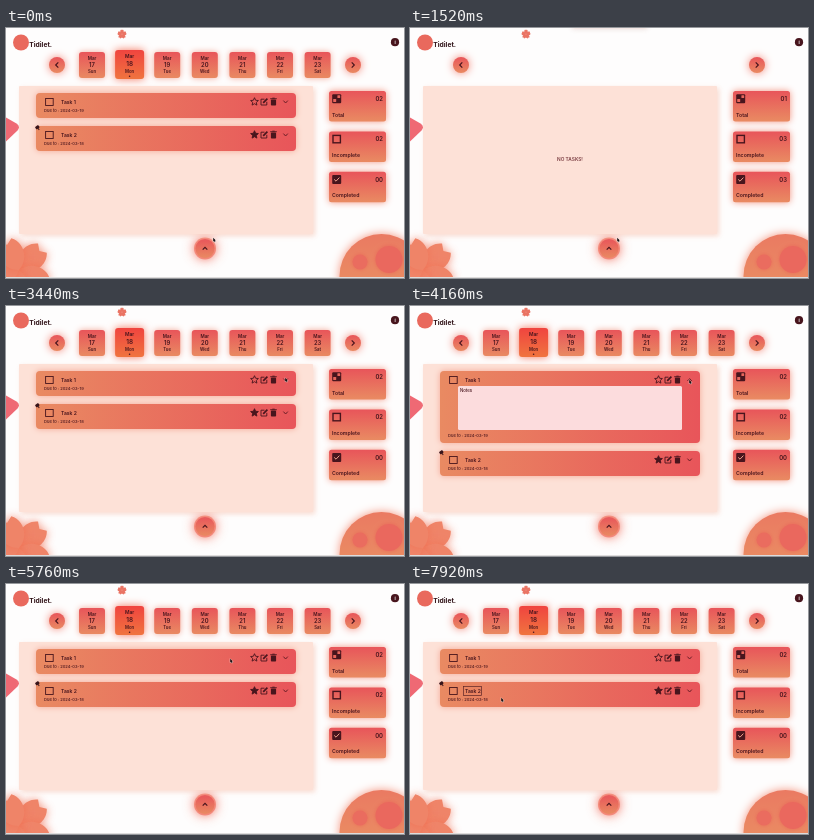
An HTML page with a canvas that plays this animation: 398x250 px, repeating every 8 s.

```html
<!DOCTYPE html>
<html lang="en">
<head>
<meta charset="utf-8">
<title>Task list</title>
<style>
html, body { margin: 0; width: 100%; height: 100%; overflow: hidden; background: #fefdfd; }
canvas { display: block; width: 398px; height: 250px; }
</style>
</head>
<body>
<canvas id="stage"></canvas>
<script>
const W = 398, H = 250, LOOP = 8000;
const INK = '#48151d', RED = '#e8555a', ORANGE = '#e98a62';
const canvas = document.getElementById('stage');
const ctx = canvas.getContext('2d');
const ratio = window.devicePixelRatio || 1;
canvas.width = W * ratio;
canvas.height = H * ratio;

// Times of the story, in ms
const RELOAD = 1040, LOADED = 2000;
const TOAST_IN = 1495, TOAST_OUT = 3000;
const OPEN = 3600, CLOSE = 4800, EDIT = 7400;

const POINTER = [
  [0, 208, 211], [1800, 208, 211], [2400, 295, 130], [3000, 281, 76],
  [3440, 280, 73], [4160, 280, 75], [5000, 280, 75], [5600, 225, 76],
  [5900, 225, 76], [6700, 66, 75], [7150, 64, 106], [7500, 64, 107],
  [7850, 92, 115], [8000, 92, 115]
];

const clamp = v => Math.max(0, Math.min(1, v));
const part = (t, start, length) => clamp((t - start) / length);
const easeOut = p => 1 - (1 - p) ** 3;
const smooth = p => p * p * (3 - 2 * p);

function blend(x0, y0, x1, y1, from, to) {
  const g = ctx.createLinearGradient(x0, y0, x1, y1);
  g.addColorStop(0, from);
  g.addColorStop(1, to);
  return g;
}

function glow(color, blur, dx = 0, dy = 0) {
  ctx.shadowColor = color;
  ctx.shadowBlur = blur * ratio;
  ctx.shadowOffsetX = dx * ratio;
  ctx.shadowOffsetY = dy * ratio;
}

function noGlow() {
  glow('transparent', 0);
}

function box(x, y, w, h, r, fill) {
  ctx.beginPath();
  ctx.roundRect(x, y, w, h, r);
  ctx.fillStyle = fill;
  ctx.fill();
}

function disc(x, y, r, fill) {
  ctx.beginPath();
  ctx.arc(x, y, r, 0, Math.PI * 2);
  ctx.fillStyle = fill;
  ctx.fill();
}

function line(points, color = INK, width = 1) {
  ctx.beginPath();
  points.forEach(([x, y]) => ctx.lineTo(x, y));
  ctx.strokeStyle = color;
  ctx.lineWidth = width;
  ctx.stroke();
}

function text(s, x, y, size, weight = 600, align = 'left', color = INK) {
  ctx.font = `${weight} ${size}px Inter, sans-serif`;
  ctx.textAlign = align;
  ctx.fillStyle = color;
  ctx.fillText(s, x, y);
}

function flower(x, y, size, turn, fill) {
  ctx.save();
  ctx.translate(x, y);
  ctx.fillStyle = fill;
  for (let i = 0; i < 5; i++) {
    ctx.save();
    ctx.rotate(turn + i * Math.PI * 0.4);
    ctx.scale(size, size);
    ctx.beginPath();
    ctx.moveTo(0, 0);
    ctx.bezierCurveTo(0.2, -0.45, 0.75, -0.5, 1, -0.2);
    ctx.lineTo(0.87, 0);
    ctx.lineTo(1, 0.2);
    ctx.bezierCurveTo(0.75, 0.5, 0.2, 0.45, 0, 0);
    ctx.fill();
    ctx.restore();
  }
  ctx.restore();
}

function scenery() {
  ctx.fillStyle = '#fefdfd';
  ctx.fillRect(0, 0, W, H);

  flower(116, 6.2, 4.6, -Math.PI / 2, '#ea7464');

  ctx.beginPath();
  ctx.moveTo(-2, 88.5);
  ctx.lineTo(10.5, 95.5);
  ctx.quadraticCurveTo(15, 98.5, 11.5, 102.5);
  ctx.lineTo(0, 113.5);
  ctx.lineTo(-2, 114);
  ctx.fillStyle = '#ef6974';
  ctx.fill();

  glow('rgba(240,110,80,.75)', 10);
  flower(13, 242, 32, -0.75, '#ef8468');
  disc(375.5, 248, 42, blend(0, 206, 0, 250, '#ea7a62', '#ea8a62'));
  glow('rgba(232,80,80,.5)', 4);
  disc(354, 234, 7.5, '#ea6c5f');
  disc(383, 231.5, 13.5, '#ea685e');
  noGlow();

  ctx.fillStyle = '#dedcdc';
  ctx.fillRect(0, 249, W, 1);
}

function roundButton(x, y, r, dir) {
  glow('rgba(238,90,70,.75)', r);
  disc(x, y, r, blend(0, y - r, 0, y + r, RED, ORANGE));
  noGlow();
  const tip = dir === 'up'
    ? [[x - 2.3, y + 1.2], [x, y - 1.2], [x + 2.3, y + 1.2]]
    : [[x - dir * 1.3, y - 2.6], [x + dir * 1.3, y], [x - dir * 1.3, y + 2.6]];
  line(tip, INK, 1.2);
}

function header() {
  disc(15, 14.5, 8, '#e9695d');
  text('Tidilet.', 23.3, 19.2, 6.7, 700, 'left', '#32151a');
  disc(389, 14.2, 4.1, INK);
  text('i', 389, 15.8, 4.5, 700, 'center', '#fff');
  roundButton(51, 37, 8, -1);
  roundButton(347, 37, 8, 1);
  glow('rgba(240,80,60,.7)', 14);
  disc(199, 220.5, 11, 'rgba(240,105,85,.6)');
  roundButton(199, 220.5, 9.5, 'up');
}

function dates() {
  'Sun Mon Tue Wed Thu Fri Sat'.split(' ').forEach((name, i) => {
    const x = 86 + i * 37.6, on = i === 1;
    const w = on ? 29 : 26, top = on ? 22 : 24;
    glow(on ? 'rgba(242,80,50,.8)' : 'rgba(236,120,95,.65)', on ? 8 : 6);
    box(x - w / 2, top, w, on ? 29 : 26, 3,
      on ? blend(0, 22, 0, 51, '#f0443f', '#f0743f') : blend(0, 24, 0, 50, RED, ORANGE));
    noGlow();
    text('Mar', x, on ? 30 : 32, on ? 4.9 : 4.6, 600, 'center');
    text(17 + i, x, on ? 38 : 39.2, on ? 6.4 : 5.8, 600, 'center');
    text(name, x, 45.2, 4.3, 600, 'center');
    if (on) disc(x, 48.2, 0.8, INK);
  });
}

function stats(values) {
  ['Total', 'Incomplete', 'Completed'].forEach((label, i) => {
    const y = 63 + i * 40.4;
    glow('rgba(238,110,85,.75)', 7);
    box(323, y, 57, 30.5, 2.5, blend(0, y, 0, y + 30, RED, ORANGE));
    noGlow();
    if (i === 1) {
      ctx.strokeStyle = INK;
      ctx.lineWidth = 1.4;
      ctx.strokeRect(327, y + 4, 7.4, 7.4);
    } else {
      box(326.2, y + 3.2, 9, 9, 1, INK);
    }
    if (i === 0) {
      box(327.2, y + 8, 3, 3, 0.5, '#e8665c');
      box(331.4, y + 4.2, 2.8, 2.8, 0.5, '#e8665c');
    }
    if (i === 2) line([[328.2, y + 7.6], [330, y + 9.4], [333.4, y + 5.8]], '#f0a08c', 1);
    text(values[i], 377, y + 9.8, 5.9, 600, 'right');
    text(label, 326, y + 25.6, 5.2, 600);
  });
}

function star(x, y, filled) {
  ctx.beginPath();
  for (let i = 0; i < 10; i++) {
    const a = -Math.PI / 2 + i * Math.PI / 5, r = i % 2 ? 1.9 : 4.1;
    ctx.lineTo(x + r * Math.cos(a), y + r * Math.sin(a));
  }
  ctx.closePath();
  ctx.strokeStyle = ctx.fillStyle = INK;
  ctx.lineWidth = 0.9;
  ctx.stroke();
  if (filled) ctx.fill();
}

function actions(y, starred, open) {
  star(248.5, y, starred);
  line([[258.5, y - 2.6], [255, y - 2.6], [255, y + 3.2], [260.8, y + 3.2], [260.8, y]], INK, 0.9);
  line([[257.2, y + 1], [261.4, y - 3.2]], INK, 1.7);
  box(264.9, y - 2.2, 5.2, 6, 0.8, INK);
  ctx.fillRect(264.2, y - 3.5, 6.6, 0.9);
  ctx.fillRect(266.3, y - 4.1, 2.4, 0.8);
  const d = 1.2 * (1 - 2 * open);
  line([[277.4, y - d], [279.6, y + d], [281.8, y - d]], '#6c1f27', 1);
}

function card(y, extra, title, due, starred, editing) {
  const h = 25 + extra;
  glow('rgba(238,130,105,.6)', 6);
  box(30, y, 260, h, 4, blend(30, 0, 290, 0, ORANGE, RED));
  noGlow();

  if (extra > 1) {
    ctx.save();
    ctx.beginPath();
    ctx.rect(30, y + 14, 260, extra - 1);
    ctx.clip();
    box(48, y + 15, 224, Math.max(0, extra - 3), 1.5, '#fcdcdd');
    text('Notes', 50, y + 21, 4.3, 500);
    ctx.restore();
  }

  ctx.strokeStyle = INK;
  ctx.lineWidth = 0.9;
  ctx.strokeRect(39.6, y + 5.5, 7.6, 7);
  text(title, 55, y + 10.9, 5, 600);
  text(due, 38, y + h - 6, 4.1, 500);
  actions(y + 8.8, starred, extra / 47);
  if (starred) {
    ctx.save();
    ctx.translate(31.5, y + 1.5);
    ctx.rotate(-0.6);
    box(-2, -1.8, 4, 3, 0.8, '#38141a');
    ctx.fillRect(-0.5, 1, 1, 2);
    ctx.restore();
  }
  if (editing) {
    ctx.strokeStyle = '#5b2427';
    ctx.lineWidth = 0.7;
    ctx.strokeRect(53.4, y + 4.4, 18, 9);
  }
}

function panel(t, ready) {
  glow('rgba(245,190,170,.55)', 5, 2, 2);
  box(13, 58, 294, 148, 1, '#fde1d7');
  noGlow();
  if (!ready) {
    text('NO TASKS!', 160, 133.3, 4.8, 600, 'center', '#7a3c40');
    return;
  }
  const extra = 47 * (smooth(part(t, OPEN, 300)) - smooth(part(t, CLOSE, 300)));
  card(65, extra, 'Task 1', 'Due to : 2024-03-19', false, false);
  card(98 + extra, 0, 'Task 2', 'Due to : 2024-03-18', true, t >= EDIT);
}

function toast(t) {
  const enter = easeOut(part(t, TOAST_IN, 350));
  const leave = easeOut(part(t, TOAST_OUT, 350));
  if (enter === 0 || leave === 1) return;
  const y = -28 + 40 * enter - 6 * leave;
  ctx.save();
  ctx.globalAlpha = (0.5 + 0.5 * enter) * (1 - leave);
  glow('rgba(150,80,60,.28)', 5, 0, 1);
  box(161.5, y, 76.5, 20, 3, '#fcdcd1');
  noGlow();
  disc(173, y + 10, 4.1, INK);
  text('!', 173, y + 11.8, 5, 700, 'center', '#fcdcd1');
  line([[181.5, y + 6], [181.5, y + 14]], INK, 0.7);
  text('Welcome to Tidilet', 184.3, y + 11.8, 4.95, 600);
  ctx.restore();
}

function pointer(t) {
  const i = Math.max(1, POINTER.findIndex(k => k[0] > t));
  const [t0, x0, y0] = POINTER[i - 1], [t1, x1, y1] = POINTER[i];
  const p = smooth(part(t, t0, t1 - t0));
  ctx.save();
  ctx.translate(x0 + (x1 - x0) * p, y0 + (y1 - y0) * p);
  ctx.beginPath();
  [[0, -1.2], [0, 2.6], [0.9, 1.9], [1.6, 3.2], [2.2, 2.8], [1.6, 1.6], [2.7, 1.5]]
    .forEach(([x, y]) => ctx.lineTo(x - 0.8, y));
  ctx.closePath();
  ctx.strokeStyle = 'rgba(255,255,255,.75)';
  ctx.lineWidth = 0.7;
  ctx.stroke();
  ctx.fillStyle = '#151012';
  ctx.fill();
  ctx.restore();
}

function draw(now) {
  const t = now % LOOP;
  const ready = t < RELOAD || t >= LOADED;
  ctx.setTransform(ratio, 0, 0, ratio, 0, 0);
  noGlow();
  scenery();
  header();
  if (ready) dates();
  stats(ready ? ['02', '02', '00'] : ['01', '03', '03']);
  panel(t, ready);
  toast(t);
  pointer(t);
}

const start = performance.now();
function tick() {
  draw(performance.now() - start);
  requestAnimationFrame(tick);
}
tick();
</script>
</body>
</html>
```
